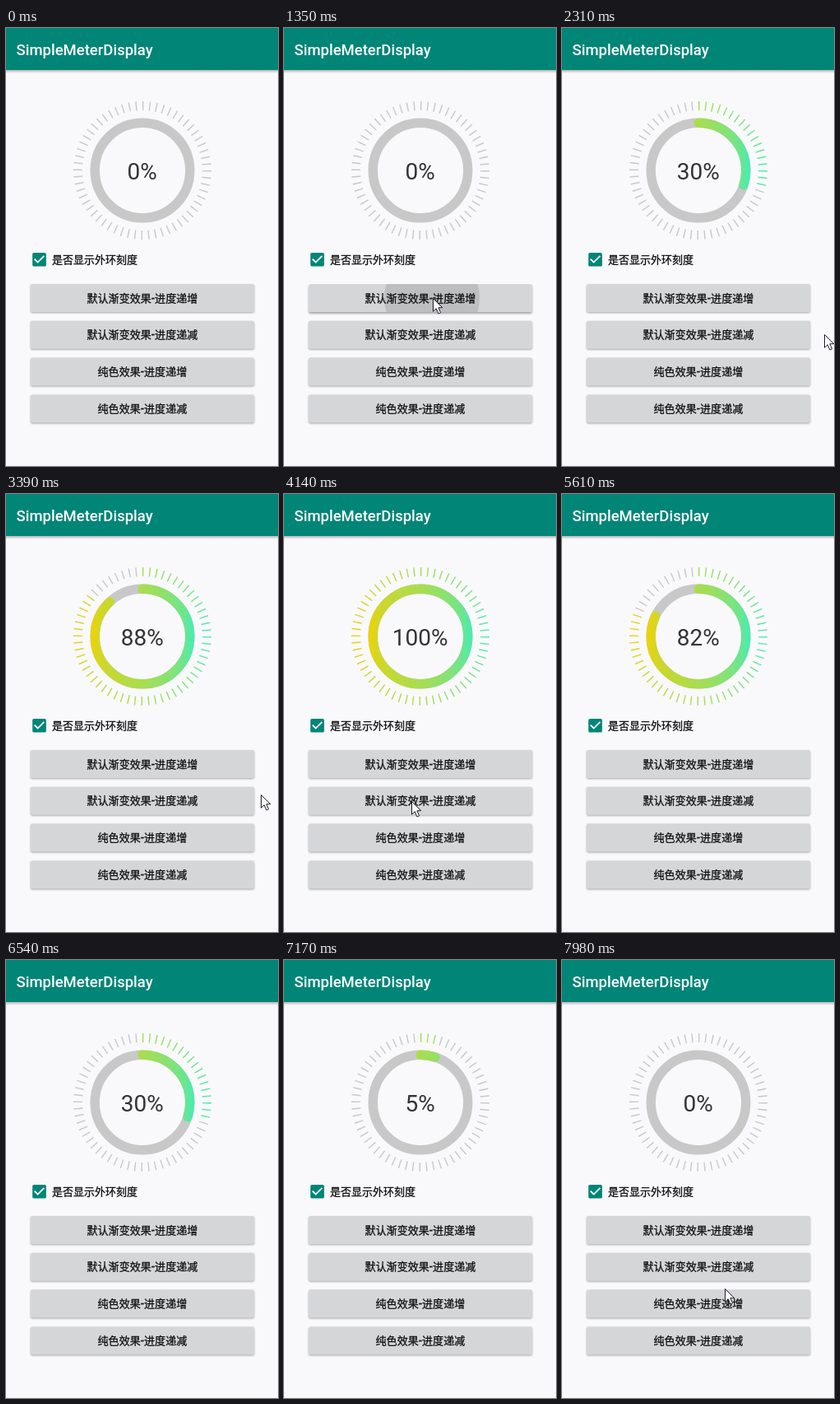
These frames come from a looping animation (331 px wide and 532 px high, 8 s). An HTML page:

```html
<!DOCTYPE html>
<html lang="zh-CN">
<head>
<meta charset="utf-8">
<title>Progress demo</title>
<style>
  html, body { margin: 0; width: 100%; height: 100%; overflow: hidden; background: #f9f9fc; }
  svg { display: block; width: 100vw; height: 100vh; }
  text { font-family: Roboto, "Noto Sans CJK SC", "Noto Sans CJK", sans-serif; font-size: 13px; fill: #111; }
  .title { font-size: 18.5px; font-weight: 500; fill: #fff; }
  .percent { font-size: 28px; fill: #333; text-anchor: middle; }
  .label { stroke: #111; stroke-width: .3px; }
  .button { font-size: 13.05px; font-weight: 500; text-anchor: middle; }
</style>
</head>
<body>
<svg viewBox="0 0 331 532">
  <defs>
    <linearGradient id="sweep" gradientUnits="userSpaceOnUse" x1="108.2" x2="223.8" y1="0" y2="0"></linearGradient>
    <linearGradient id="fade" x1="0" x2="0" y1="0" y2="1">
      <stop offset="0" stop-opacity=".28"/>
      <stop offset="1" stop-opacity="0"/>
    </linearGradient>
    <filter id="soft" x="-5%" y="-30%" width="110%" height="160%"><feGaussianBlur stdDeviation="1"/></filter>
  </defs>
  <rect width="331" height="532" fill="#f9f9fc"/>
  <rect y="51" width="331" height="4" fill="url(#fade)"/>
  <rect width="331" height="51" fill="#008577"/>
  <text class="title" x="12.5" y="32.5">SimpleMeterDisplay</text>

  <g id="ticks" stroke-width="1.4"></g>
  <g fill="none" stroke-width="11.4">
    <circle cx="166" cy="173" r="57.8" stroke="#c8c8c8"/>
    <path id="arc" d="M166 115.2a57.8 57.8 0 0 1 0 115.6a57.8 57.8 0 0 1 0-115.6"
      pathLength="100" stroke="url(#sweep)" stroke-linecap="round"/>
  </g>
  <text id="percent" class="percent" x="165.7" y="184">0%</text>

  <g transform="translate(29.4 270.1) scale(.927)">
    <rect x="3" y="3" width="18" height="18" rx="2" fill="#008577"/>
    <path d="M5.7 11.3l4.3 4.3 8.3-8.3" fill="none" stroke="#fff" stroke-width="2"/>
  </g>
  <text class="label" x="56" y="286">是否显示外环刻度</text>

  <g id="buttons"></g>
  <path id="pointer" d="M.5.5V16.2L4.2 12.7 6.9 19 9.6 17.8 6.9 11.7H11.8Z" fill="#fff" stroke="#1c1c28"/>
</svg>
<script>
const LOOP = 8000, RUN = 2652;
const CX = 166, CY = 173, TICKS = 60;
const GREY = '#c8c8c8';
const COLORS = [[79, 234, 172], [168, 221, 81], [232, 211, 15]];
const LABELS = ['默认渐变效果-进度递增', '默认渐变效果-进度递减', '纯色效果-进度递增', '纯色效果-进度递减'];
const CLICKS = [
  { button: 0, press: 1110, release: 1322, x: 180, y: 328 },
  { button: 1, press: 4650, release: 4862, x: 155, y: 373 }
];
// Pointer visits: [time, x, y]
const VISITS = [
  [[180, 315, 75], [330, 258, 190], [480, 196, 304], [600, 180, 328], [810, 180, 328], [840, 179, 328],
   [1340, 179, 328], [2100, 288, 359], [2310, 319, 372], [2600, 319, 371], [2900, 310, 365],
   [3420, 310, 365], [3740, 180, 362], [4140, 155, 373], [4870, 155, 373], [5400, 331, 409]],
  [[7560, 331, 412], [7800, 225, 404], [7980, 198, 399], [8000, 198, 399]]
];

const $ = id => document.getElementById(id);
const clamp = v => Math.max(0, Math.min(1, v));
const mix = (a, b, k) => a + (b - a) * k;
const ease = k => (1 - Math.cos(Math.PI * clamp(k))) / 2;

function add(parent, tag, attrs, text = '') {
  const el = document.createElementNS('http://www.w3.org/2000/svg', tag);
  for (const key in attrs) el.setAttribute(key, attrs[key]);
  el.textContent = text;
  return parent.appendChild(el);
}

// Colour at an angular distance from the right-hand side, 0..PI
function sweepColor(angle) {
  const k = angle / Math.PI * 2, i = Math.min(1, Math.floor(k));
  return `rgb(${COLORS[i].map((c, n) => Math.round(mix(c, COLORS[i + 1][n], k - i)))})`;
}

// The sweep mirrors about the horizontal axis, so cosine-spaced stops reproduce it
for (let i = 16; i >= 0; i--) {
  const a = i / 16 * Math.PI;
  add($('sweep'), 'stop', { offset: (1 + Math.cos(a)) / 2, 'stop-color': sweepColor(a) });
}

const ticks = Array.from({ length: TICKS }, (_, i) => {
  const deg = i * 360 / TICKS + 0.5;
  const el = add($('ticks'), 'path', { d: `M${CX} ${CY - 84}v11`, transform: `rotate(${deg} ${CX} ${CY})` });
  return { el, color: sweepColor(Math.acos(Math.sin(deg * Math.PI / 180))) };
});

const buttons = LABELS.map((label, i) => {
  const y = 311 + i * 44.8, g = $('buttons');
  const box = { x: 30, y, width: 272, height: 34, rx: 2 };
  const shadow = add(g, 'rect', { ...box, y: y + 1, opacity: 0.33, filter: 'url(#soft)' });
  add(g, 'rect', { ...box, fill: '#d5d6d8' });
  add(add(g, 'clipPath', { id: 'clip' + i }), 'rect', box);
  const ripple = add(g, 'circle', { 'clip-path': `url(#clip${i})`, opacity: 0 });
  add(g, 'text', { class: 'label button', x: 165.9, y: y + 21.6 }, label);
  return { shadow, ripple, y };
});

function progressAt(t) {
  const [up, down] = CLICKS.map(c => c.release);
  if (t < down) return Math.floor(100 * ease((t - up) / RUN));
  if (t >= 7550) return 0;
  return Math.max(1, 100 - Math.floor(100 * ease((t - down) / RUN)));
}

function pointerAt(t) {
  const path = VISITS.find(v => t >= v[0][0] && t < v[v.length - 1][0]);
  if (!path) return null;
  const i = path.findIndex(p => p[0] > t);
  const a = path[i - 1], b = path[i], k = (t - a[0]) / (b[0] - a[0]);
  return [mix(a[1], b[1], k), mix(a[2], b[2], k)];
}

function drawClick({ button, press, release, x, y }, t) {
  const { shadow, ripple, y: top } = buttons[button];
  const lift = clamp((t - press) / 60) * (1 - clamp((t - release) / 100));
  shadow.setAttribute('y', top + 1 + lift * 1.3);
  const k = (t - release) / 450;
  const active = k >= 0 && k < 1;
  ripple.setAttribute('opacity', active ? 0.12 * (1 - k) : 0);
  if (active) {
    ripple.setAttribute('cx', x);
    ripple.setAttribute('cy', y);
    ripple.setAttribute('r', 20 + 150 * Math.sqrt(k));
  }
}

function draw(t) {
  const p = progressAt(t);
  $('percent').textContent = p + '%';
  $('arc').setAttribute('stroke-dasharray', p + ' 200');
  $('arc').setAttribute('visibility', p ? 'visible' : 'hidden');
  const lit = Math.floor(p * TICKS / 100);
  ticks.forEach((tick, i) => tick.el.setAttribute('stroke', i < lit ? tick.color : GREY));
  CLICKS.forEach(click => drawClick(click, t));
  const at = pointerAt(t);
  $('pointer').setAttribute('visibility', at ? 'visible' : 'hidden');
  if (at) $('pointer').setAttribute('transform', `translate(${at.map(Math.round)})`);
}

const start = performance.now();
function frame(now) {
  draw(Math.max(0, now - start) % LOOP);
  requestAnimationFrame(frame);
}
draw(0);
requestAnimationFrame(frame);
</script>
</body>
</html>
```
